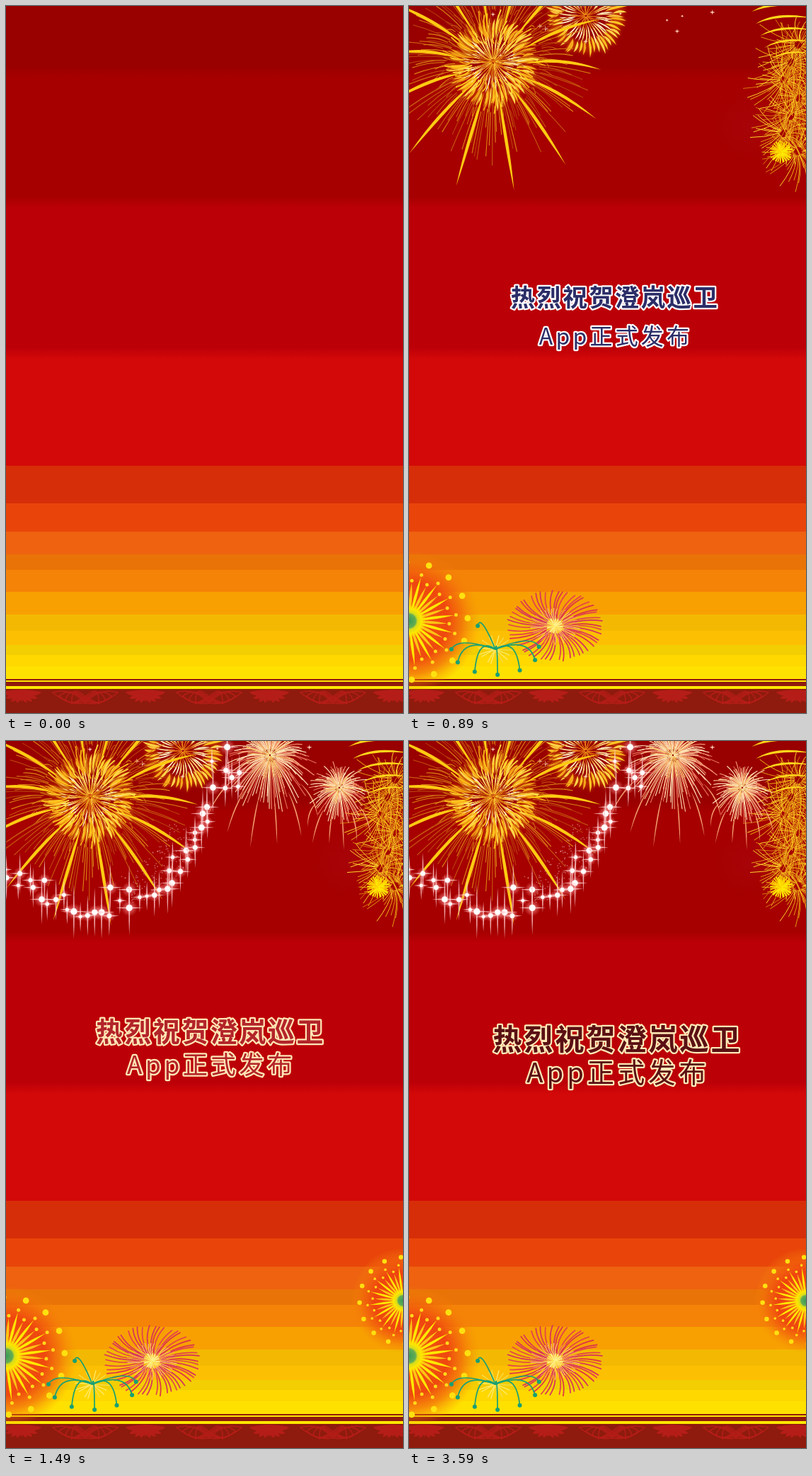
Recreate the animation shown at these times as an HTML page with a canvas. Size 561 px wide and 998 px high, loop 5290 ms.

```html
<!DOCTYPE html>
<html lang="zh-CN">
<head>
<meta charset="utf-8">
<title>Celebration</title>
<style>
  html, body { margin: 0; width: 100%; height: 100%; overflow: hidden; background: #a50000; }
  canvas, svg { position: absolute; left: 0; top: 0; width: 100%; height: 100%; display: block; }
  text {
    font-family: "Noto Sans CJK SC", "Noto Sans CJK", sans-serif;
    text-anchor: middle; paint-order: stroke; stroke-linejoin: round; stroke-width: 4.5px;
  }
  #head { font-weight: 900; letter-spacing: .07em; }
  #sub { font-weight: 500; letter-spacing: .13em; }
</style>
</head>
<body>
<canvas id="stage" width="561" height="998"></canvas>
<svg viewBox="0 0 561 998" preserveAspectRatio="none">
  <text id="head">热烈祝贺澄岚巡卫</text>
  <text id="sub">App正式发布</text>
</svg>
<script>
const W = 561, H = 998, LOOP = 5290, TAU = Math.PI * 2;
const ctx = document.getElementById('stage').getContext('2d');
const head = document.getElementById('head');
const sub = document.getElementById('sub');

let seed = 7;
const rnd = () => (seed = (seed * 16807) % 2147483647) / 2147483647;
const range = (a, b) => a + (b - a) * rnd();
const pick = list => list[Math.floor(rnd() * list.length)];
const polar = (x, y, a, r, sy = 1) => [x + Math.cos(a) * r, y + Math.sin(a) * r * sy];

// Curved stroke that tapers at both ends.
function lens(g, [x0, y0], [cx, cy], [x1, y1], w) {
  const len = Math.hypot(x1 - x0, y1 - y0) || 1;
  const nx = -(y1 - y0) / len * w, ny = (x1 - x0) / len * w;
  g.beginPath();
  g.moveTo(x0, y0);
  g.quadraticCurveTo(cx + nx, cy + ny, x1, y1);
  g.quadraticCurveTo(cx - nx, cy - ny, x0, y0);
  g.fill();
}

// Curved stroke of even width.
function hair(g, [x0, y0], [cx, cy], [x1, y1], w) {
  g.lineWidth = w;
  g.beginPath();
  g.moveTo(x0, y0);
  g.quadraticCurveTo(cx, cy, x1, y1);
  g.stroke();
}

function burst(g, x, y, n, r0, r1, w, cols, o = {}) {
  const { shape = hair, jit = .15, droop = 0, bend = 0, sy = 1, glow } = o;
  g.save();
  if (glow) { g.shadowColor = glow; g.shadowBlur = 5; }
  for (let i = 0; i < n; i++) {
    const a = (i + range(-.4, .4)) / n * TAU;
    const far = r1 * (1 - jit * rnd()), near = r0 * range(.8, 1.2);
    const end = polar(x, y, a, far, sy), mid = polar(x, y, a - bend, (near + far) / 2, sy);
    end[1] += droop;
    mid[1] -= droop * .2;
    g.fillStyle = g.strokeStyle = pick(cols);
    shape(g, polar(x, y, a, near, sy), mid, end, w);
  }
  g.restore();
}

function dot(g, x, y, r, color) {
  g.fillStyle = color;
  g.beginPath();
  g.arc(x, y, r, 0, TAU);
  g.fill();
}

function halo(g, x, y, r, stops) {
  const f = g.createRadialGradient(x, y, 0, x, y, r);
  stops.forEach(([p, c]) => f.addColorStop(p, c));
  dot(g, x, y, r, f);
}

function star(g, x, y, rx, ry, w, color) {
  g.fillStyle = color;
  lens(g, [x - rx, y], [x, y], [x + rx, y], w);
  lens(g, [x, y - ry], [x, y], [x, y + ry], w);
}

function backdrop(g) {
  const bands = [
    [0, '#990000'], [92, '#a60000'], [277, '#bc0008'], [490, '#d30808'],
    [649, '#d62e08'], [702, '#e9450a'], [742, '#ee6210'], [774, '#ea7307'],
    [796, '#f58307'], [827, '#f8a002'], [859, '#f3b902'], [882, '#fdbf02'],
    [902, '#f2ce02'], [916, '#ffd800'], [932, '#ffe100']
  ];
  const f = g.createLinearGradient(0, 0, 0, H);
  bands.forEach(([y, c], i) => {
    const soft = y < 600 ? 8 : 0;
    if (i) f.addColorStop((y - soft) / H, bands[i - 1][1]);
    f.addColorStop((i ? y + soft : 0) / H, c);
  });
  g.fillStyle = f;
  g.fillRect(0, 0, W, H);
  g.fillStyle = '#8e1b0d';
  g.fillRect(0, 950, W, 48);
  g.fillStyle = '#ffe800';
  g.fillRect(0, 952, W, 2);
  g.fillRect(0, 960, W, 4);
  for (let x = 22; x < W; x += 175) {
    lotus(g, x);
    leaves(g, x + 90);
  }
}

function lotus(g, x) {
  g.fillStyle = '#b51d18';
  for (let i = -4; i <= 4; i++) {
    const a = Math.PI / 2 - i * .36, r = 17 + Math.abs(i) * 3;
    lens(g, [x, 965], polar(x, 965, a + i * .08, r * .6), polar(x, 965, a, r), 7);
  }
}

function leaves(g, x) {
  g.strokeStyle = '#b51d18';
  for (const s of [-1, 1]) {
    for (let k = 0; k < 4; k++) {
      const tip = [x + s * (46 - k * 9), 969 + k * 5], root = [x, 984 - k * 3];
      hair(g, root, [x + s * 20, 962 - k * 2], tip, 1.6);
      hair(g, root, [x + s * 24, 988], tip, 1.6);
    }
  }
}

function sun(g, x, y, s) {
  halo(g, x, y, 100 * s, [
    [0, '#ee5a10'], [.55, 'rgba(238,66,16,.95)'], [.75, 'rgba(242,100,12,.7)'], [1, 'rgba(245,140,8,0)']
  ]);
  for (let i = 0; i < 32; i++) {
    const a = i / 32 * TAU + .07, r = (i % 2 ? 64 : 54) * s;
    g.fillStyle = i % 2 ? '#ffe800' : '#ffc414';
    lens(g, polar(x, y, a, 8 * s), polar(x, y, a, r / 2), polar(x, y, a, r), 4 * s);
    dot(g, ...polar(x, y, a, r + 3), 2.5 * s, '#ffd91a');
    if (i % 2) dot(g, ...polar(x, y, a + .08, 83 * s), 4.4 * s, '#ffe010');
  }
  halo(g, x, y, 24 * s, [[0, '#379a58'], [.4, '#66ad52'], [.5, '#d6dc1c'], [.75, '#ffe600'], [1, 'rgba(255,230,0,0)']]);
}

function palm(g, x, y) {
  const leaf = '#18a074';
  burst(g, x, y, 18, 3, 26, 1.4, ['#ffe96a', '#f3dc4a'], { sy: .8 });
  const arm = a => {
    const tip = polar(x, y, a, 62, .58);
    const bow = [x + (tip[0] - x) * .85, Math.min(y, tip[1]) - 18];
    g.strokeStyle = leaf;
    hair(g, [x, y], bow, tip, 1.7);
    dot(g, ...tip, 3, leaf);
  };
  for (let i = 0; i < 7; i++) arm(i * .54 - .1);
  arm(4.3);
}

const CREAM = ['#ffeaa0', '#ffd777', '#fff2c4'];
const GOLD = ['#ffc928', '#ffd94c', '#f5aa1c'];
const AMBER = ['#e59a12', '#f0b014', '#d9780c', '#ffd42a'];

function flower(g, x, y, r, n) {
  burst(g, x, y, n, r * .52, r, 3.4, GOLD, { shape: lens, bend: .08, glow: '#e87800' });
  burst(g, x, y, n * .8, r * .22, r * .72, 1.9, CREAM, { shape: lens, bend: .1 });
  burst(g, x, y, n * .5, 2, r * .35, 1, ['#f4a31c', '#e87812']);
}

function firstBursts(g) {
  flower(g, 119, 81, 69, 52);
  flower(g, 250, 14, 61, 50);

  // Tangle of overlapping thin bursts down the right edge.
  halo(g, 480, 170, 50, [[0, 'rgba(170,10,22,.4)'], [1, 'rgba(170,10,22,0)']]);
  for (let i = 0; i < 7; i++) {
    const y = 55 + i * 25;
    burst(g, 550 - 10 * (i % 3), y, 42, 6, 66 - i * 2, 1, AMBER, { jit: .6, bend: .25, droop: 6 });
  }
  burst(g, 526, 206, 30, 1, 16, 1.8, ['#ffe900', '#ffd000']);
  g.fillStyle = '#ffd61a';
  for (let i = 0; i < 5; i++) {
    const y = 8 + i * 17;
    lens(g, [484 + i * 6, y], [515 + i * 5, y - 16], [570, y - 8], 4 - i * .4);
  }

  for (let i = 0; i < 14; i++) {
    const x = range(40, 430), y = range(0, 140) * (1 - x / 600), r = range(2, 5);
    star(g, x, y, r, r, 1.6, '#ffd0b8');
  }

  sun(g, 0, 868, 1);
  burst(g, 206, 875, 50, 14, 68, 1.7, ['#dc3448', '#e3434c', '#d6325e'], { bend: .22, sy: .74, jit: .06 });
  burst(g, 206, 875, 40, 6, 36, 1, ['#ffd27a', '#f7a45c'], { bend: .15, sy: .74 });
  burst(g, 206, 875, 16, 1, 11, 1.8, ['#fff08a', '#ffe35c']);
  palm(g, 122, 908);
}

function bigBurst(g) {
  const x = 119, y = 78;
  burst(g, x, y, 170, 62, 142, 1.1, ['#c85a10', '#dd8414', '#b8400c'], { jit: .5, droop: 6 });
  burst(g, x, y, 70, 30, 74, 1.8, ['#ffc31a', '#f09a12', '#ffd93c', '#c9620c'], { jit: .4, bend: .12 });
  burst(g, x, y, 44, 4, 32, 1, ['#ffc93a', '#d9780c']);
  for (let i = 0; i < 14; i++) {
    const a = .51 + i * .45, r = 150 + 35 * Math.abs(Math.sin(a));
    const bow = polar(x, y, a, r * .6);
    bow[1] -= 14 * Math.abs(Math.cos(a));
    g.fillStyle = '#ffcb12';
    lens(g, polar(x, y, a, 45), bow, polar(x, y, a, r), 4.5);
  }
}

function pinkBursts(g) {
  const tones = ['#ffcf9a', '#f79a78', '#ffe2b8', '#e8705a'];
  for (const [x, y, r, n] of [[373, 20, 72, 120], [471, 66, 45, 90]]) {
    burst(g, x, y, n, r * .15, r, 1.1, tones, { jit: .45, droop: r * .15 });
    burst(g, x, y, n * .4, 2, r * .5, 1, ['#ffe9b0', '#f5c060']);
    for (let i = 0; i < 6; i++) {
      const a = .75 + i * .36;
      g.fillStyle = '#f5a070';
      lens(g, polar(x, y, a, r * .8), polar(x, y, a, r * 1.2), polar(x, y + 25, a, r * range(1.1, 1.55)), 1.6);
    }
  }
}

function sparkle(g, x, y) {
  const s = range(.6, 1.25);
  halo(g, x, y, 10 * s, [[0, 'rgba(255,240,235,.9)'], [.4, 'rgba(255,165,165,.5)'], [1, 'rgba(255,120,120,0)']]);
  star(g, x, y, 16 * s, 32 * s, 2, 'rgba(255,205,205,.8)');
  dot(g, x, y, 3.8 * s, '#fff');
}

function sparkles(g) {
  // A ragged arc below the big burst, then a cluster beside it.
  for (let i = 0; i < 40; i++) {
    sparkle(g, ...polar(119, 80, .08 + i / 39 * 2.36, 170 - 45 * rnd() * rnd()));
  }
  for (let i = 0; i < 9; i++) sparkle(g, range(285, 330), range(0, 70));
  for (let i = 0; i < 160; i++) {
    dot(g, ...polar(119, 80, range(.3, 1.2), range(115, 165)), .9, 'rgba(225,150,150,.6)');
  }
}

function layer(draw) {
  const c = document.createElement('canvas');
  c.width = W;
  c.height = H;
  const g = c.getContext('2d');
  g.lineCap = 'round';
  draw(g);
  return c;
}

const layers = [
  [0, backdrop], [730, firstBursts], [890, bigBurst], [1090, pinkBursts], [1260, sparkles],
  [1490, g => sun(g, 561, 790, .74)]
].map(([at, draw]) => ({ at, img: layer(draw) }));

// k scales both lines; y and gap place their centres.
const titles = [
  { at: 890, k: 1, x: 291, y: 411, gap: 55, fill: '#2b2d68', edge: '#ffffff' },
  { at: 1490, k: 1.1, x: 289, y: 410, gap: 47, fill: '#b3242a', edge: '#ffe6b4' },
  { at: 2290, k: 1, x: 291, y: 411, gap: 46, fill: '#b3242a', edge: '#ffe6b4' },
  { at: 3590, k: 1.195, x: 294.5, y: 420, gap: 47, fill: '#5b1014', edge: '#ffe9b6' }
];

function setLine(el, x, y, size, { fill, edge }) {
  const attrs = { x, y: y + size * .38, 'font-size': size, fill, stroke: edge };
  for (const key in attrs) el.setAttribute(key, attrs[key]);
}

const start = performance.now();
function frame() {
  const t = (performance.now() - start) % LOOP;
  for (const l of layers) if (t >= l.at) ctx.drawImage(l.img, 0, 0);
  const s = titles.filter(s => t >= s.at).pop();
  head.parentNode.style.visibility = s ? 'visible' : 'hidden';
  if (s) {
    setLine(head, s.x, s.y, 34.4 * s.k, s);
    setLine(sub, s.x + 1, s.y + s.gap, 32 * s.k, s);
  }
  requestAnimationFrame(frame);
}
frame();
</script>
</body>
</html>
```
